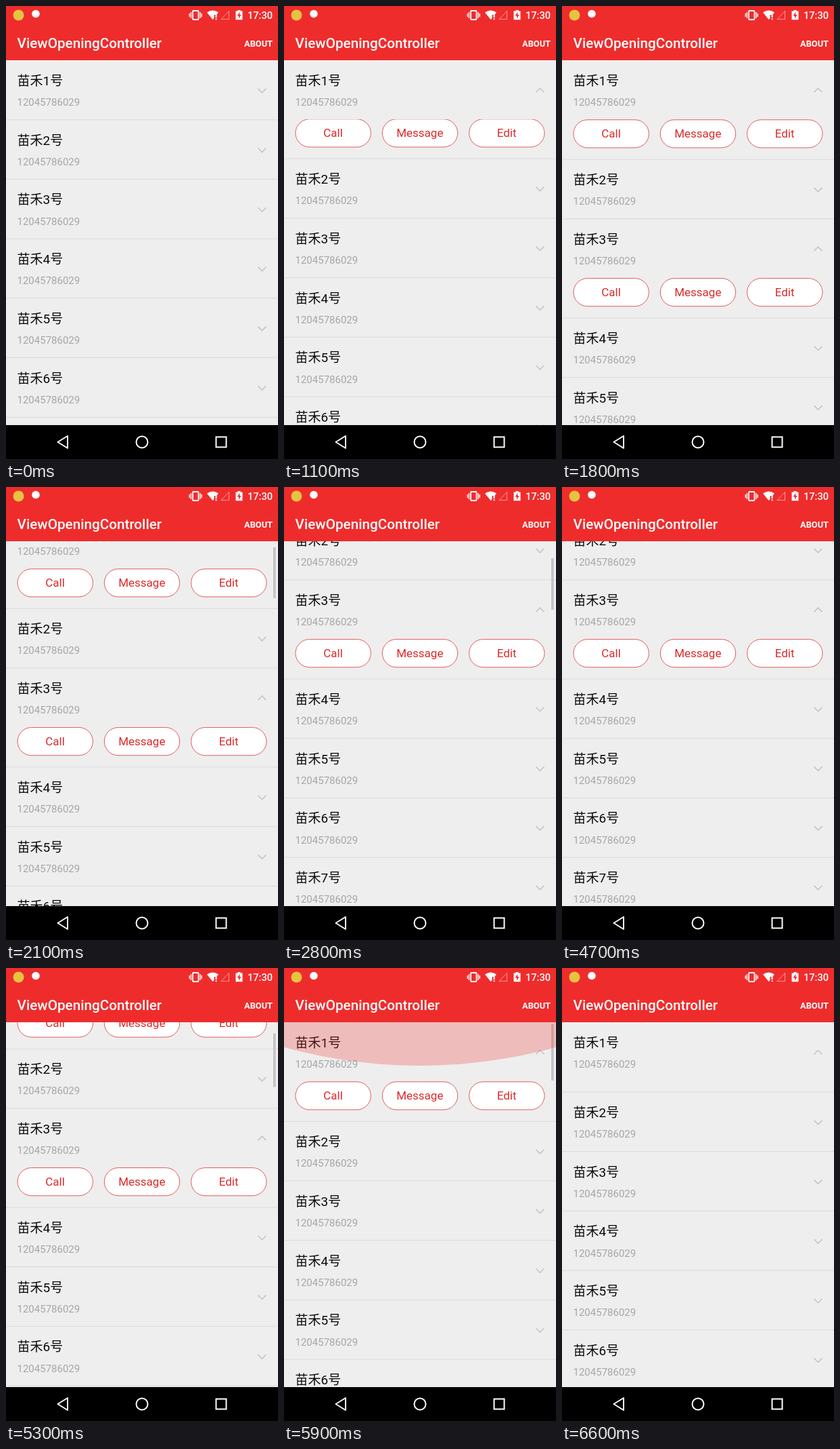
An HTML page for the animation above (6700 ms loop, 402 by 668 pixels).

```html
<!DOCTYPE html>
<html lang="zh-CN">
<head>
<meta charset="utf-8">
<title>ViewOpeningController</title>
<style>
  html, body { margin: 0; width: 100%; height: 100%; overflow: hidden; background: #eee; }
  svg { display: block; width: 402px; height: 668px; }
  text { font-family: Roboto, "Noto Sans CJK SC", "Noto Sans CJK", sans-serif; }
  .name { font-size: 19px; fill: #0b0b0b; }
  .phone { font-size: 15px; fill: #a6a6a6; }
  .sep { stroke: #dadada; }
  .arrow { fill: none; stroke: #c6c6c6; stroke-width: 1.6; }
  .button rect { fill: #fff; stroke: #e25a5a; }
  .button text { font-size: 17px; fill: #dc2a2a; text-anchor: middle; }
  .bar text { fill: #fff; font-weight: 500; }
  .line { fill: none; stroke: #fff; }
</style>
</head>
<body>
<svg viewBox="0 0 402 668">
  <defs>
    <clipPath id="below"><rect y="86.7" width="402" height="70"/></clipPath>
    <clipPath id="view"><rect y="80" width="402" height="538"/></clipPath>
  </defs>
  <rect width="402" height="668" fill="#eee"/>
  <g clip-path="url(#view)">
    <g id="list"></g>
    <rect id="thumb" x="395" width="3.6" fill="#c3c3c3"/>
    <ellipse id="glow" cx="201" rx="603" fill="#ef2c2c"/>
  </g>

  <g class="bar">
    <rect width="402" height="80" fill="#ef2c2c"/>
    <text x="16.5" y="62" font-size="20.7">ViewOpeningController</text>
    <text x="394" y="60.4" font-size="12.8" text-anchor="end" style="font-weight:700">ABOUT</text>
    <text x="394" y="19" font-size="14.6" text-anchor="end">17:30</text>
    <circle cx="18.5" cy="13.5" r="8" fill="#e6c341"/>
    <circle cx="44" cy="11.5" r="5.8" fill="#fff"/>
    <!-- vibrate -->
    <rect class="line" x="276" y="7" width="8.5" height="13" rx="1" stroke-width="1.8"/>
    <path class="line" d="M273.4 9v9M271.2 11v5M287 9v9M289.2 11v5" stroke-width="1.4"/>
    <!-- wifi -->
    <path d="M297 9.6Q305.500 3.500 314 9.600L311 13H307.500V18L305.500 20Z" fill="#fff"/>
    <path d="M309.600 12h2v5h-2zM309.600 18.200h2v2h-2z" fill="#fff"/>
    <!-- signal -->
    <path class="line" d="M318 19.500H329.500V7.500Z" stroke-width="1" opacity=".5"/>
    <!-- battery -->
    <path d="M339.500 7.500h3v-1.500h4v1.500h3v12.700h-10z" fill="#fff"/>
    <path d="M345.400 8.800L341.600 14.500H344V18.600L347.600 12.900H345.400Z" fill="#ef2c2c"/>
  </g>

  <rect y="618" width="402" height="50"/>
  <g class="line" stroke-width="2">
    <path d="M91 634V652L76.500 643Z" stroke-linejoin="round"/>
    <circle cx="201" cy="643" r="8.500"/>
    <rect x="310.500" y="635.500" width="15" height="15"/>
  </g>
</svg>
<script>
const LOOP = 6700, STEP = 100, SLIDE = 350;
const TOP = 80.3, ROW = 87.7, PANEL = 58.4;

// Opening and closing start times by row index
const toggles = { 0: [779, 6369], 2: [1410, 5330], 4: [2920, 4280] };

// [time, value] pairs, linear in between
const scrollKeys = [[1900, 0], [2000, 16], [2100, 47], [2200, 88], [2300, 124], [2400, 150],
  [2500, 166], [2600, 174], [2700, 177], [4800, 177], [5000, 150], [5200, 112], [5300, 107],
  [5650, 107], [5750, 55], [5830, 0]];
const thumbAlpha = [[1900, 0], [2000, 1], [2950, 1], [3250, 0], [4800, 0], [4900, 1], [6100, 1], [6400, 0]];
const thumbSize = [[1900, 79], [2100, 75], [5300, 79], [5700, 83]];
const glowAlpha = [[5800, 0], [5900, .26], [6000, .26], [6350, 0]];
const glowScale = [[5800, .3], [5900, .79], [6000, .85], [6350, 0]];

const $ = id => document.getElementById(id);
const set = (el, attrs) => Object.entries(attrs).forEach(([k, v]) => el.setAttribute(k, v));

function at(keys, t) {
  const next = keys.findIndex(k => k[0] > t);
  if (next === 0) return keys[0][1];
  if (next < 0) return keys[keys.length - 1][1];
  const [t0, a] = keys[next - 1], [t1, b] = keys[next];
  return a + (b - a) * (t - t0) / (t1 - t0);
}

function ease(t, start) {
  const p = Math.min(1, Math.max(0, (t - start) / SLIDE));
  return .5 - .5 * Math.cos(Math.PI * p);
}

const button = (label, i) => `<g class="button" transform="translate(${17 + i * 128.3} 87.5)">
  <rect width="111.400" height="41.200" rx="20.600"/><text x="55.500" y="26.500">${label}</text></g>`;

const row = i => `<g>
  <g clip-path="url(#below)"><g class="panel">${['Call', 'Message', 'Edit'].map(button).join('')}</g></g>
  <text class="name" x="16.500" y="36.800">苗禾${i + 1}号</text>
  <text class="phone" x="16.500" y="67">12045786029</text>
  <path class="arrow"/>
  <line class="sep" x2="402"/></g>`;

$('list').innerHTML = Array.from({ length: 9 }, (_, i) => row(i)).join('');
const rows = [...$('list').children].map(el => ({
  el,
  panel: el.querySelector('.panel'),
  arrow: el.querySelector('.arrow'),
  sep: el.querySelector('.sep')
}));

function draw(t) {
  const scroll = at(scrollKeys, t);
  let y = TOP - scroll;
  rows.forEach(({ el, panel, arrow, sep }, i) => {
    const times = toggles[i];
    const open = times ? ease(t, times[0]) - ease(t, times[1]) : 0;
    const height = ROW + PANEL * open;
    set(el, { transform: `translate(0 ${y})` });
    set(panel, { transform: `translate(0 ${PANEL * (open - 1)})` });
    set(arrow, { d: open > .001 ? 'M372.500 47L378.500 41L384.500 47' : 'M372.500 41.500L378.500 47.500L384.500 41.500' });
    set(sep, { y1: height - .2, y2: height - .2 });
    y += height;
  });

  set($('thumb'), { y: 83 + scroll * .125, height: at(thumbSize, t), opacity: at(thumbAlpha, t) });
  const s = at(glowScale, t);
  set($('glow'), { cy: 80 - 522 * s, ry: 603 * s, opacity: at(glowAlpha, t) });
}

function tick() {
  const t = performance.now() % LOOP;
  draw(Math.floor(t / STEP) * STEP);
  requestAnimationFrame(tick);
}
tick();
</script>
</body>
</html>
```
